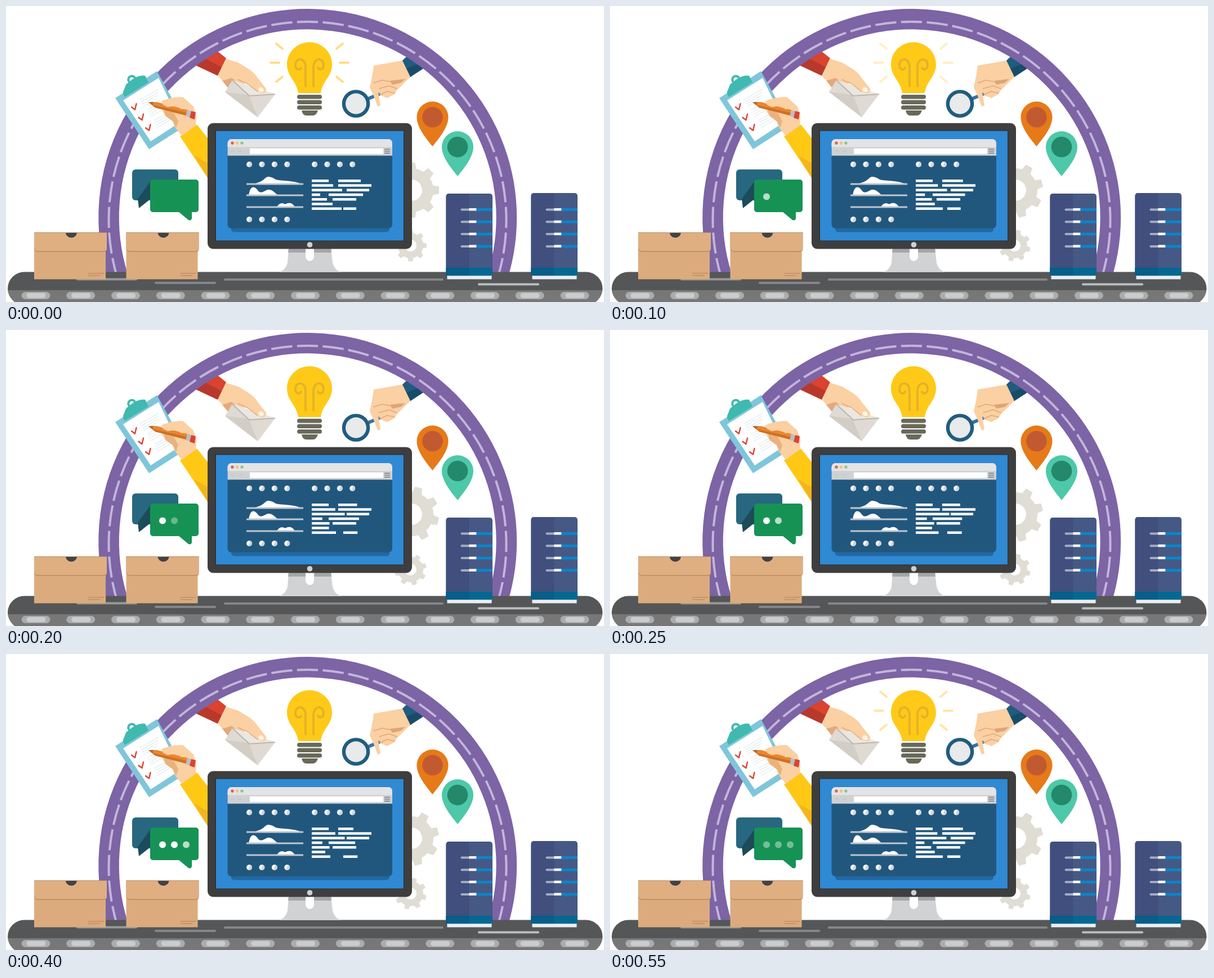
An HTML page with a canvas that plays this animation: 1062 by 527 pixels, repeating every 0.6 s.

```html
<!DOCTYPE html>
<html lang="en">
<head>
<meta charset="utf-8">
<title>Workflow</title>
<style>
html, body { margin: 0; width: 100%; height: 100%; overflow: hidden; background: #fff; }
canvas { display: block; width: 1062px; height: 527px; }
</style>
</head>
<body>
<canvas id="stage" width="1062" height="527"></canvas>
<script>
const c = document.getElementById('stage').getContext('2d');
const TAU = Math.PI * 2;
const STEP = 50, STEPS = 12;

function box(x, y, w, h, color, r = 0) {
  c.fillStyle = color;
  c.beginPath();
  c.roundRect(x, y, w, h, r);
  c.fill();
}

function disc(x, y, r, color) {
  c.fillStyle = color;
  c.beginPath();
  c.arc(x, y, r, 0, TAU);
  c.fill();
}

function line(x1, y1, x2, y2, color, w, cap = 'butt') {
  c.strokeStyle = color;
  c.lineWidth = w;
  c.lineCap = cap;
  c.beginPath();
  c.moveTo(x1, y1);
  c.lineTo(x2, y2);
  c.stroke();
}

function fill(d, color) {
  c.fillStyle = color;
  c.fill(new Path2D(d));
}

function trace(d, color, w) {
  c.strokeStyle = color;
  c.lineWidth = w;
  c.lineCap = c.lineJoin = 'round';
  c.stroke(new Path2D(d));
}

function sleeves() {
  fill('M325 100L360 68L391 93L376 124Z', '#d9432f');
  fill('M325 100L344 88L383 109L376 124Z', '#b8392b');
  fill('M703 98L720 82L752 104L717 127Z', '#1f5c7d');
  fill('M710 112L745 98L752 104L717 127Z', '#194c69');
}

function arch() {
  c.lineCap = 'butt';
  c.strokeStyle = '#7c64a5';
  c.lineWidth = 36.5;
  c.beginPath();
  c.arc(535.7, 376.5, 353.2, Math.PI - 0.35, TAU + 0.35);
  c.stroke();

  // two mirrored halves keep one dash centred on the crown
  c.strokeStyle = '#c4b5da';
  c.lineWidth = 4;
  c.setLineDash([37.5, 8.3]);
  c.lineDashOffset = 18.75;
  for (const left of [true, false]) {
    c.beginPath();
    c.arc(535.5, 381, 353, -Math.PI / 2, left ? Math.PI - 0.3 : 0.3, left);
    c.stroke();
  }
  c.setLineDash([]);
}

function clipboard() {
  fill('M194 164L268 116L321 212L254 255Z', '#7fc6da');
  fill('M208 168L271 128L309 207L257 241Z', '#fff');
  fill('M208 153L213 140Q232 122 247 124L253 136L211 162L208 157Z', '#40b9b0');
  trace('M218 134A6 6 0 1 1 229 128', '#40b9b0', 4);
  for (let i = 0; i < 3; i++) {
    const x = 223 + i * 12.5, y = 180 + i * 18.5;
    trace(`M${x} ${y}L${x + 6} ${y + 4.5}L${x + 8.5} ${y - 6}`, '#dd4030', 2.4);
    for (let k = 0; k < 4; k++) {
      const a = x + 15 + k * 2, b = y - 13 + k * 4;
      line(a, b, a + 33 - k * 3, b - 19 + k * 1.6, '#d6e6e8', 1);
    }
  }
}

function writingHand() {
  fill('M309 232L339 211L362 240L362 312Z', '#ffc815');
  fill('M334 266L362 282V312Z', '#f3b51a');
  fill('M275 170Q294 161 314 162L333 179L338 197L337 213L312 231L300 216L296 205L283 196L277 186L290 180Z', '#fbd0a2');
  fill('M280 184L298 190L306 205L302 217L296 205L284 196Z', '#e9b27f');
  fill('M253 171L268 171L322 185L320 195L265 181Z', '#e98630');
  fill('M259 176L321 190L320 195L265 181Z', '#cf7023');
  fill('M253 171L262 171L260 177Z', '#b56628');
  fill('M322 185L329 187L326 198L319 196Z', '#b9bec4');
  fill('M329 187L337 189L335 202L326 199Z', '#d84334');
  fill('M276 170Q294 161 313 163L324 179L313 184L300 178L287 180L279 176Z', '#fbd0a2');
}

function mailHand() {
  fill('M391 94L413 101L435 115L448 130L420 139L397 146L376 124Z', '#fbd0a2');
  fill('M384 133L401 128L410 136L396 148Z', '#e2aa7c');
  fill('M402 132L478 157L447 198L389 153Z', '#dfdbd4');
  fill('M402 132L478 157L433 161Z', '#eae7e1');
  fill('M389 153L431 158L447 198Z', '#d2cec5');
  trace('M403 133L432 160L477 157', '#bbb7af', 2);
  fill('M404 113L424 108Q440 116 449 131L462 147Q463 155 456 156L446 152L430 138L411 130Z', '#fbd0a2');
  trace('M412 131L430 139L446 152', '#e2aa7c', 1.6);
  c.fillStyle = '#fff6ea';
  c.beginPath();
  c.ellipse(453, 149, 5, 4, 0.6, 0, TAU);
  c.fill();
}

function lensHand() {
  line(641, 166, 674, 152, '#3472a8', 6);
  disc(621.5, 174, 24.8, '#205d7e');
  disc(621.5, 174, 18.5, '#e8eaec');
  fill('M653 106L676 102L704 97L718 126L694 150L690 157L677 164L667 160L661 153L665 177L660 179L653 160L646 145L651 121Z', '#fbd0a2');
  fill('M682 133L709 130L701 137L686 140Z', '#dda578');
  trace('M653 137L668 132L682 135M664 158L677 152L690 155M663 147L680 142L694 147', '#dfa97c', 1.7);
}

function bulb(glow) {
  c.globalAlpha = glow;
  for (const s of [-1, 1]) {
    const ray = (x1, y1, x2, y2) => line(539 + s * x1, y1, 539 + s * x2, y2, '#ffdc87', 4, 'round');
    ray(54, 101, 69, 101);
    ray(48, 76, 59, 67);
    ray(48, 126, 59, 135);
  }
  c.globalAlpha = 1;
  fill('M539 64.5C561 64.5 579 82 579 104C579 126 562 133 559 155H519C516 133 499 126 499 104C499 82 517 64.5 539 64.5Z', '#ffc917');
  trace('M532 143V109C532 91 514 91 514 105C514 114 522 115 524 110M546 143V109C546 91 564 91 564 105C564 114 556 115 554 110', '#e1b12c', 3.6);
  box(517, 158, 44, 7.5, '#69695a', 4);
  box(517, 167.5, 44, 7.5, '#69695a', 4);
  box(517, 177, 44, 7.5, '#69695a', 4);
  fill('M525 186H554Q551 195 545 195H533Q527 195 525 186Z', '#69695a');
}

function pin(x, y, color, core) {
  fill(`M${x} ${y + 52}C${x - 13} ${y + 36} ${x - 28} ${y + 17} ${x - 28} ${y}A28 28 0 0 1 ${x + 28} ${y}C${x + 28} ${y + 17} ${x + 13} ${y + 36} ${x} ${y + 52}Z`, color);
  disc(x, y, 18.3, core);
}

function gear(x, y, r, hole, angle) {
  const teeth = 8, pitch = TAU / teeth, root = r * 0.79;
  c.fillStyle = '#dfddd4';
  c.beginPath();
  for (let i = 0; i < teeth; i++) {
    const a = angle + i * pitch;
    const pts = [[root, -0.28], [r, -0.17], [r, 0.17], [root, 0.28], [root, 0.5]];
    for (const [q, k] of pts) c.lineTo(x + q * Math.cos(a + k * pitch), y + q * Math.sin(a + k * pitch));
  }
  c.closePath();
  c.fill();
  disc(x, y, hole, '#fff');
}

function chat(step) {
  box(224, 291, 82, 55, '#27677f', 6);
  fill('M234 343L236 360L256 344V313L232 346Z', '#1c4b5b');
  box(256, 309, 86, 58, '#179255', 5);
  fill('M306 366L324 381Q329 383 330 378V366Z', '#179255');
  const fade = Math.min(1, (STEPS - step) * 0.4);
  for (let i = 0; i < 3; i++) {
    const a = Math.min(1, Math.max(0, (step - 3 * i) * 0.35));
    c.globalAlpha = a * fade;
    disc(278 + i * 21, 339.5, 6, '#fff');
  }
  c.globalAlpha = 1;
}

function knob(x, y) {
  disc(x, y, 5, '#f4f5f6');
  c.fillStyle = '#cfd3d8';
  c.beginPath();
  c.arc(x, y, 5, -1.2, 1.9);
  c.fill();
}

function textBars(step) {
  const grow = (1 - Math.cos(TAU * step / STEPS)) / 2;
  const shrink = step <= 8 ? step / 8 : (STEPS - step) / 4;
  const rows = [
    [543, 573, 590, 630 - 13 * shrink],
    [543, 581 + 5 * grow, 590, 649],
    [543, 597 + 6 * grow, 605, 645],
    [543, 558 + 5 * grow, 573, 634 - 14 * shrink],
    [543, 570 + 6 * grow, 580, 622],
    [543, 580 - 13 * shrink],
    [543, 596 - 20 * shrink, 599, 622 + 3 * grow]
  ];
  rows.forEach((row, i) => {
    for (let k = 0; k < row.length; k += 2)
      box(row[k], 309 + i * 8.25, row[k + 1] - row[k], 4.5, '#fff');
  });
}

function monitor(step) {
  fill('M502 430H577L580 457Q583 470 595 474H485Q497 470 500 457Z', '#d0d2d4');
  fill('M502 430H577L578 439H501Z', '#a5a7aa');
  box(532, 426, 15, 28, '#fff', 7.5);

  box(358, 208.5, 363, 224, '#3e3e3f', 10);
  box(371, 221, 336.5, 198, '#323334', 1);
  box(373, 222.5, 333, 195, '#2f89d3');
  disc(539.5, 425, 4.8, '#cfd0d2');

  box(400, 380, 281, 22.5, '#2168a2', 5);
  box(393.5, 237, 292.5, 159, '#22577d', 7);
  box(393.5, 237, 292.5, 29.5, '#cfd1d3', [7, 7, 0, 0]);
  box(393.5, 237, 292.5, 14, '#e3e4e5', [7, 7, 0, 0]);
  disc(402, 244, 2.7, '#e85e4d');
  disc(410.5, 244, 2.7, '#f5c56b');
  disc(419, 244, 2.7, '#8ec58c');
  box(433, 253.5, 237, 10, '#fff');
  trace('M400 259H407M400 259L403 256M412 259H419M419 259L416 256', '#c0c2c5', 1);
  for (const y of [255, 258.5, 262]) line(672, y, 682, y, '#7e8388', 1.6);

  for (let i = 0; i < 4; i++) {
    knob(432 + i * 22.4, 282);
    knob(548 + i * 22.4, 282);
    knob(432 + i * 22.4, 380);
  }
  fill('M439 317C450 314 455 312 461 306C466 302 473 305 479 309C490 312 510 310 525 317Z', '#fff');
  fill('M431 337C434 319 441 320 447 328C452 336 459 329 465 327C473 326 478 333 483 337Z', '#fff');
  fill('M481 358C485 350 492 350 496 353C502 349 509 350 513 358Z', '#fff');
  for (const y of [317, 337, 358]) line(427, y, 528, y, '#bfc7d0', 3);
  textBars(step);
}

function belt() {
  c.save();
  c.beginPath();
  c.roundRect(3, 473.5, 1056.5, 59, 29.5);
  c.clip();
  box(0, 473, 1062, 34, '#555657');
  box(0, 506, 1062, 22, '#777778');
  c.restore();
  line(389, 487, 775, 487, '#858687', 4, 'round');
  line(266, 493, 371, 493, '#858687', 4, 'round');
  line(127, 486.5, 231, 486.5, '#98999a', 4, 'round');
  line(840, 495.5, 945, 495.5, '#bcbdbe', 4, 'round');
  for (let i = 0; i < 13; i++) {
    const x = 27.5 + i * 79.75;
    box(x, 509, 51, 13, '#abacad', 6.5);
    box(x + 9, 511, 34, 9, '#cbcccd', 4.5);
  }
}

function crate(x) {
  box(x, 403, 127, 83.5, '#dcab7d');
  box(x, 403, 129, 35, '#bf8f64', [0, 0, 5, 7]);
  box(x, 403, 129, 33.3, '#dfaf82', [0, 0, 5, 7]);
  fill(`M${x + 56} 403H${x + 76}A10 9.5 0 0 1 ${x + 56} 403Z`, '#414346');
  line(x, 403.5, x + 129, 403.5, '#b98b60', 1);
  line(x + 96, 476, x + 124, 476, '#bd8d61', 1.4);
  line(x + 96, 480, x + 118, 480, '#bd8d61', 1.4);
}

function server(x, y) {
  box(x, y, 82.5, 147, '#465985', [5, 5, 0, 0]);
  box(x, y, 41, 147, '#404f7d', [5, 0, 0, 0]);
  box(x, 466, 82.5, 14, '#046892');
  box(x, 466, 41, 14, '#075e88');
  box(x + 2, 480, 79, 6.5, '#e9eff3');
  line(x + 2, 480.5, x + 81, 480.5, '#b9cbd6', 1);
  for (let i = 0; i < 4; i++) {
    const r = 360 + i * 21.8;
    box(x + 26, r + 0.5, 17, 4, '#a4adc1', 2);
    box(x + 41, r, 13, 4.5, '#fff');
    box(x + 54, r, 28.5, 5, '#0b85c9');
  }
}

function draw(step) {
  c.fillStyle = '#fff';
  c.fillRect(0, 0, 1062, 527);
  // one tooth passes every three steps
  const turn = step * TAU / 24;
  gear(720, 328, 49.5, 19, turn);
  gear(718.5, 426.5, 28.5, 10.5, -turn);
  sleeves();
  arch();
  clipboard();
  writingHand();
  mailHand();
  bulb(Math.max(0, 1 - Math.min(step, STEPS - step) * 0.27));
  lensHand();
  pin(757.5, 198, '#e67a18', '#c25a31');
  pin(802, 251, '#4dc8a8', '#24886b');
  chat(step);
  belt();
  monitor(step);
  crate(50);
  crate(213.5);
  server(781.5, 334);
  server(932.5, 333);
}

let start = null, shown = -1;
function tick(now) {
  if (start === null) start = now;
  const step = Math.floor((now - start) / STEP) % STEPS;
  if (step !== shown) draw(shown = step);
  requestAnimationFrame(tick);
}
draw(0);
requestAnimationFrame(tick);
</script>
</body>
</html>
```
